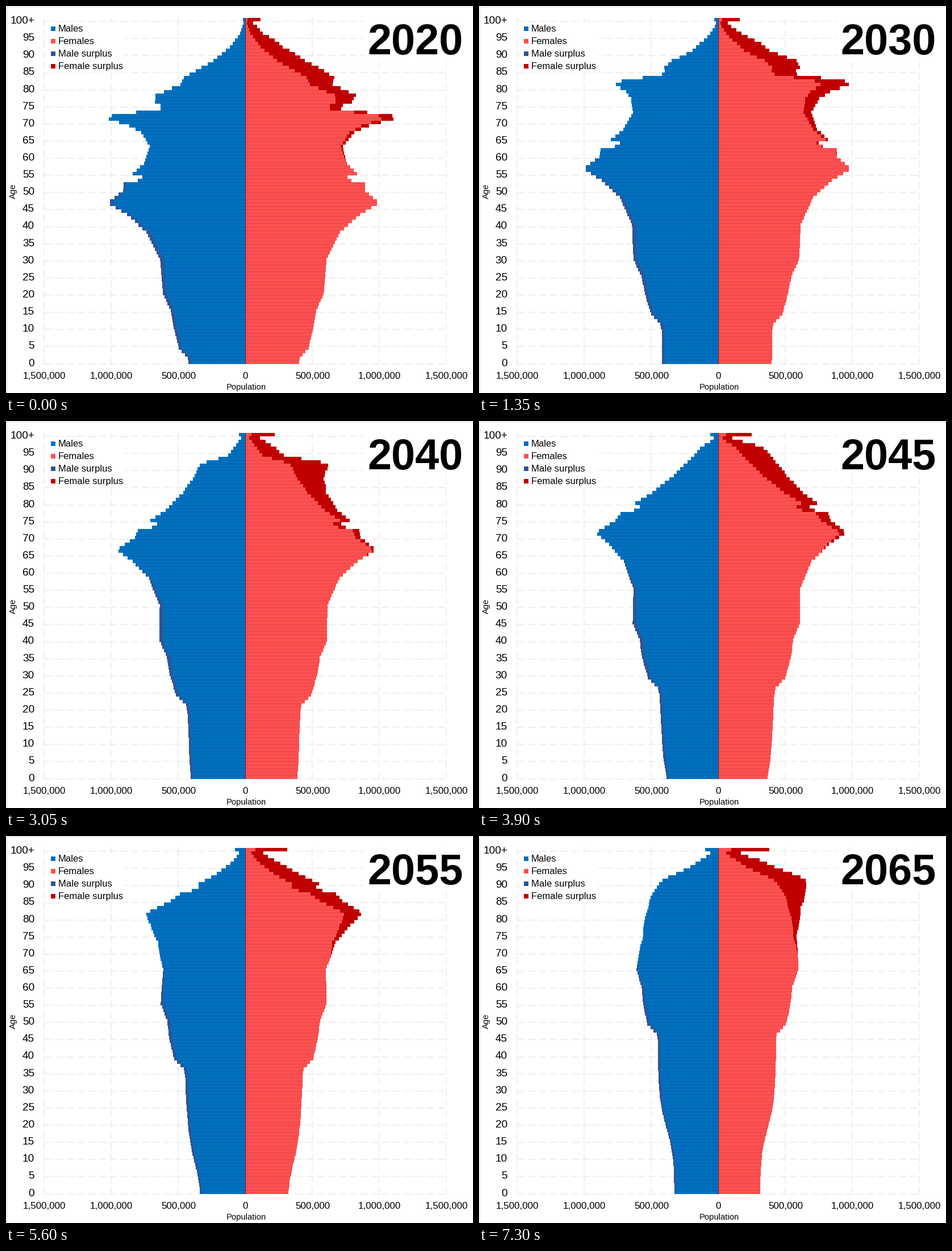
Recreate the animation shown at these times as a matplotlib script. Size 822 px wide and 681 px high, loop 8 s.

```python
import numpy as np
import matplotlib.pyplot as plt
from matplotlib.animation import FuncAnimation
from matplotlib.collections import LineCollection
from matplotlib.patches import Rectangle

W, H, DPI = 822, 681, 100
MID, BASE, STEP = 421, 629.5, 6.025    # axis centre, age 0 line, bar height
HALF_MILLION = 118.1                   # all populations are in pixels of width
BLUE, RED, NAVY, CRIMSON = "#0070c0", "#ff5050", "#2f5597", "#c00000"
INTERVAL, LOOP = 50, 8000

AGES = np.arange(101)
YEARS = range(2020, 2066, 5)

# Turning points of the male age profile in 2020: (age, width)
PROFILE = [
    (0, 100), (1, 101), (4, 117), (10, 126), (15, 131), (20, 145), (30, 150),
    (38, 174), (43, 208), (46, 238), (47, 238), (50, 215), (52, 214),
    (53, 189), (54, 181), (55, 198), (58, 178), (63, 168), (67, 183),
    (69, 204), (71, 240), (72, 235), (74, 149), (75, 149), (76, 159),
    (78, 158), (81, 114), (83, 108), (88, 56), (92, 27), (96, 9), (99, 3)]


def women_per_man(age):
    midlife = 0.035 / (1 + np.exp((46 - age) / 6))
    return 0.953 + midlife + 0.32 * np.exp(0.127 * (age - 80))


def births(year):
    return 77 + 22 / (1 + np.exp((year - 2047) / 4))


def centenarians(year, first, last):
    return first + (last - first) * ((year - 2020) / 45) ** 1.15


def project(pop, birth_share, oldest, hazard80, growth, gain):
    """Age the population year by year; return one profile per shown year."""
    age = AGES + 0.5
    migration = 0.0038 * np.exp(-((age - 22) / 16) ** 2) - 0.0007
    hazard = hazard80 * np.exp(growth * (age - 80))
    progress = gain * np.clip((105 - age) / 15, 0, 1)
    shown = {}
    for year in range(YEARS[0], YEARS[-1] + 1):
        pop[100] = centenarians(year, *oldest)
        shown[year] = pop.copy()
        deaths = hazard * np.exp(-progress * (year - 2025))
        pop[1:] = (pop * np.exp(migration - deaths))[:-1]
        pop[0] = birth_share * births(year + 1)
    return shown


start = np.interp(AGES, *zip(*PROFILE))
women = project(start * women_per_man(AGES), 0.957, (27, 90), 0.0205, 0.147, 0.019)
men = project(start, 1, (4, 23), 0.043, 0.12, 0.0145)

fig = plt.figure(figsize=(W / DPI, H / DPI), dpi=DPI, facecolor="white")
ax = fig.add_axes([0, 0, 1, 1])
ax.set(xlim=(0, W), ylim=(H, 0))
ax.axis("off")


def pt(px):
    return px * 72 / DPI


def label(x, y, text, size, **kw):
    kw = {"va": "baseline", "family": "Liberation Sans", **kw}
    return ax.text(x, y, text, fontsize=pt(size), color="black", zorder=6, **kw)


def box(x, y, w, h, color, zorder=6):
    ax.add_patch(Rectangle((x, y), w, h, fc=color, lw=0, zorder=zorder))


# Grid and axis labels
left, right = MID - 3 * HALF_MILLION, MID + 3 * HALF_MILLION
dashes = dict(color="#ececec", lw=pt(1.6), ls=(0, (8.5, 3.5)), zorder=1)
for age in range(0, 101, 5):
    y = BASE - age * STEP
    ax.plot([left, right], [y, y], **dashes)
    label(50, y + 4, "100+" if age == 100 else str(age), 19, ha="right")
for k in range(-3, 4):
    x = MID + k * HALF_MILLION
    ax.plot([x, x], [BASE, 21], **dashes)
    label(x + 0.5, 656, f"{abs(k) * 500000:,}", 17, ha="center")
label(422.5, 675, "Population", 14.7, ha="center")
label(12.5, 325.5, "Age", 14.7, ha="center", va="center", rotation=90)
ax.add_patch(Rectangle((0.5, 0.5), W - 1, H - 1, fill=False,
                       ec="#d9d9d9", lw=pt(1), zorder=7))

# Legend and year sit on white
box(72, 29, 138, 88, "white", 2)
box(630, 22, 178, 68, "white", 2)
legend = [("Males", BLUE), ("Females", RED),
          ("Male surplus", NAVY), ("Female surplus", CRIMSON)]
for i, (name, color) in enumerate(legend):
    y = 39.5 + 22.1 * i
    box(78.5, y - 4, 8.5, 8.5, color)
    label(91.5, y + 5.5, name, 16.6)
year_text = label(805, 85, "", 75.6, ha="right", weight="bold")

# Bars
edges = BASE - np.arange(102) * STEP


def bars(color, zorder):
    return ax.stairs(np.full(101, MID), edges[::-1], baseline=MID, fill=True,
                     orientation="horizontal", fc=color, lw=0, zorder=zorder)


def separators(color):
    lines = LineCollection([], colors=color, linewidths=pt(0.9), zorder=5)
    return ax.add_collection(lines, autolim=False)


male_all, female_all = bars(NAVY, 3), bars(CRIMSON, 3)
male_base, female_base = bars(BLUE, 4), bars(RED, 4)
male_lines, female_lines = separators("#0b60a6"), separators("#dc474a")
ax.plot([MID, MID], [BASE, edges[-1]], color="#3a2c50", lw=pt(1), zorder=5.5,
        solid_capstyle="butt")


def update(i):
    t = i * INTERVAL
    year = YEARS[0 if t < 500 else 1 + (t - 500) // 850]
    m, f = men[year], women[year]
    shared = np.minimum(m, f)
    inner = np.minimum(shared[1:], shared[:-1])
    for side, total, whole, base, lines in (
            (-1, m, male_all, male_base, male_lines),
            (1, f, female_all, female_base, female_lines)):
        whole.set_data(values=(MID + side * total)[::-1])
        base.set_data(values=(MID + side * shared)[::-1])
        lines.set_segments([[(MID, y), (MID + side * w, y)]
                            for y, w in zip(edges[1:-1], inner)])
    year_text.set_text(str(year))
    return ()


anim = FuncAnimation(fig, update, frames=LOOP // INTERVAL, interval=INTERVAL,
                     init_func=lambda: update(0), repeat=True, repeat_delay=0)
plt.show()
```
